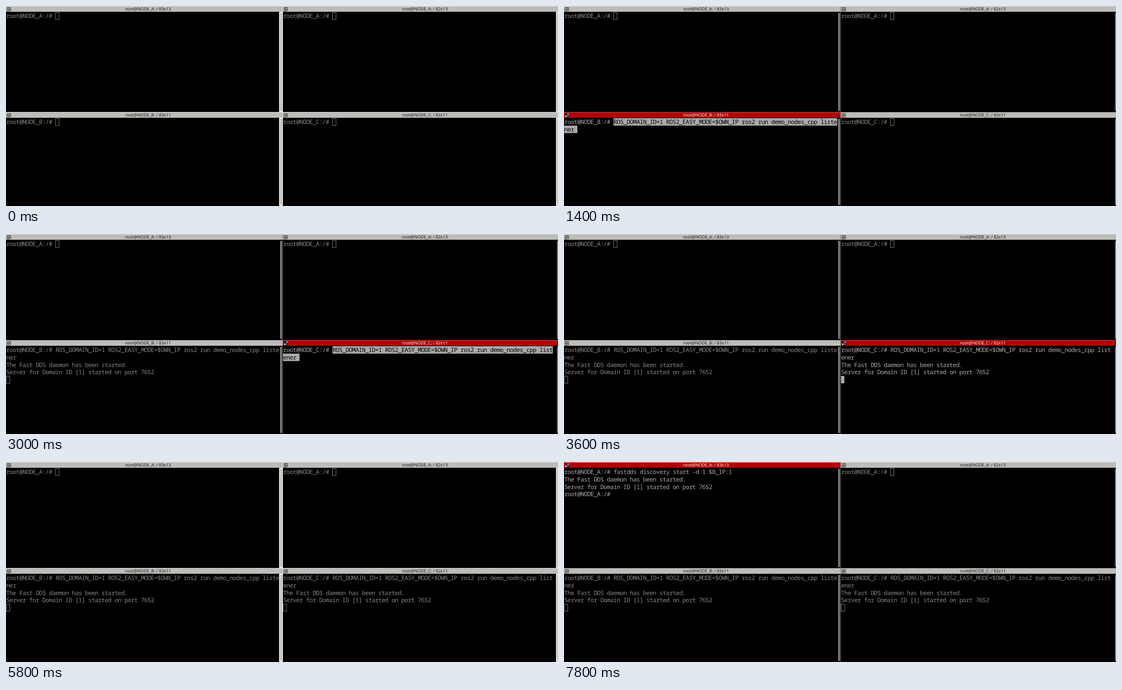
These frames come from a looping animation (1242x451 px, 8000 ms). An HTML page:

```html
<!DOCTYPE html>
<html lang="en">
<head>
<meta charset="utf-8">
<title>Four terminals</title>
<style>
  html, body { margin: 0; width: 100%; height: 100%; overflow: hidden; background: #000; }
  svg { display: block; width: 1242px; height: 451px; }
  text { white-space: pre; text-rendering: geometricPrecision; }
  .term { font: 13.4px "Noto Sans Mono", "DejaVu Sans Mono", monospace; letter-spacing: calc(7.4px - .6em); }
  .title { font: 9.6px "Open Sans", "Noto Sans", sans-serif; text-anchor: middle; }
</style>
</head>
<body>
<svg id="stage" viewBox="0 0 1242 451"></svg>
<script>
const LOOP = 8000, STEP = 200;
const CELL = 7.4, ROW = 16.75, PROMPT = 15;
const BRIGHT = '#aaaaaa', DIM = '#858585', BAR = '#bcbcb8', RED = '#b60003';
const LISTEN = 'ROS_DOMAIN_ID=1 ROS2_EASY_MODE=$OWN_IP ros2 run demo_nodes_cpp listener';
const OUTPUT = ['The Fast DDS daemon has been started.',
                'Server for Domain ID [1] started on port 7652'];

// Times in ms: focus and blink are [from, to] spans.
const panes = [
  { host: 'NODE_A', x: 0, y: 0, h: 239, cols: 83, rows: 13,
    cmd: 'fastdds discovery start -d 1 $B_IP:1', returns: true,
    focus: [6400, 8000], paste: 7000, enter: 7400, out: 7800, blink: [7800, 8000] },
  { host: 'NODE_A', x: 623, y: 0, h: 239, cols: 82, rows: 13 },
  { host: 'NODE_B', x: 0, y: 239, h: 212, cols: 83, rows: 11, cmd: LISTEN,
    focus: [600, 2600], paste: 1400, enter: 1800, out: 2200, blink: [2400, 2600] },
  { host: 'NODE_C', x: 623, y: 239, h: 212, cols: 82, rows: 11, cmd: LISTEN,
    focus: [2600, 4800], paste: 2800, enter: 3200, out: 3600, blink: [3800, 4400] }
];

const within = (t, span) => !!span && t >= span[0] && t < span[1];

const rect = (x, y, w, h, fill, extra = '') =>
  `<rect x="${x}" y="${y}" width="${w}" height="${h}" fill="${fill}" ${extra}/>`;

const label = (cls, x, y, fill, str) =>
  `<text class="${cls}" x="${x}" y="${y}" fill="${fill}">${str}</text>`;

// Share of the light scrollbar look, shown while the window is in the background.
function backdrop(t) {
  if (t < 600 || (t >= 5000 && t < 6400)) return 1;
  return [600, 4800, 6400].includes(t) ? 0.5 : 0;
}

function icon(x, y, active) {
  if (active) {
    return rect(x + 2, y + 3, 9, 9, '#300') +
      rect(x + 7, y + 3, 4, 4, '#4a9ad0') +
      rect(x + 3, y + 8, 3, 3, '#fff') +
      rect(x + 7, y + 8, 3, 3, '#2878a8');
  }
  return `<path d="M${x + 10.5} ${y + 7.5}v-4h-8v8h5M${x + 2.5} ${y + 7.5}h8M${x + 6.5} ${y + 3.5}v8"
    fill="none" stroke="#222"/><path d="M${x + 8} ${y + 9}h4l-2 2.5z" fill="#222"/>`;
}

function header(p, active) {
  const mid = p.x ? 942.5 : 319.5, w = p.x ? 619 : 622;
  return rect(p.x, p.y + 1, w, 12, active ? RED : BAR) +
    icon(p.x, p.y, active) +
    label('title', mid, p.y + 10.3, active ? '#fff' : '#111',
      `root@${p.host}: / ${p.cols}x${p.rows}`);
}

function scrollbar(p, light) {
  const x = p.x ? 1238 : 615, top = p.y + 13, h = p.h - 13;
  const thumb = (fill) => rect(x + 1.7, top + 2, 4.2, h - 4, fill, 'rx="2"');
  return thumb('#7e7e7e') +
    `<g opacity="${light}">${rect(x - .5, top, 7.5, h, '#efefea')}${thumb('#bdbdb9')}</g>`;
}

function screen(p, t) {
  const active = within(t, p.focus), ink = active ? BRIGHT : DIM;
  const left = p.x + .4, top = p.y + 14;
  const put = (col, row, str, fill) =>
    label('term', left + col * CELL, top + row * ROW + 13, fill, str);
  const prompt = `root@${p.host}:/# `;
  let svg = put(0, 0, prompt, ink), col = PROMPT, row = 0;

  if (t >= p.paste) {
    const room = p.cols - PROMPT, marked = t < p.enter;
    const parts = [p.cmd.slice(0, room), p.cmd.slice(room)].filter(Boolean);
    parts.forEach((part, i) => {
      const start = i ? 0 : PROMPT;
      if (marked) svg += rect(left + start * CELL, top + i * ROW, part.length * CELL + .3, ROW, BRIGHT);
      svg += put(start, i, part, marked ? '#000' : ink);
      row = i;
      col = start + part.length;
    });
  }
  if (t >= p.enter) {
    row++;
    col = 0;
  }
  if (t >= p.out) {
    for (const line of OUTPUT) svg += put(0, row++, line, ink);
    if (p.returns) {
      svg += put(0, row, prompt, ink);
      col = PROMPT;
    }
  }

  const cx = left + col * CELL, cy = top + row * ROW;
  if (!active) {
    svg += rect(Math.floor(cx) + .5, Math.floor(cy) + .5, 8, 16, 'none', `stroke="${DIM}"`);
  } else if (!within(t, p.blink)) {
    svg += rect(cx, cy, CELL, ROW, BRIGHT);
  }
  return svg;
}

function draw(t) {
  const light = backdrop(t);
  const edge = light === 1 ? '#e6e6e0' : light ? '#aeaeaa' : '#767676';
  stage.innerHTML = rect(0, 0, 1242, 451, '#000') +
    panes.map(p => screen(p, t) + scrollbar(p, light) + header(p, within(t, p.focus))).join('') +
    rect(0, 239, 1242, 1, edge) + rect(622, 0, 1, 451, edge) + rect(0, 0, 1242, 1, '#dcdcd8');
}

const stage = document.getElementById('stage');
const begin = performance.now();
let shown = -1;

function tick() {
  const t = Math.floor((performance.now() - begin) % LOOP / STEP) * STEP;
  if (t !== shown) draw(shown = t);
  requestAnimationFrame(tick);
}
tick();
</script>
</body>
</html>
```
